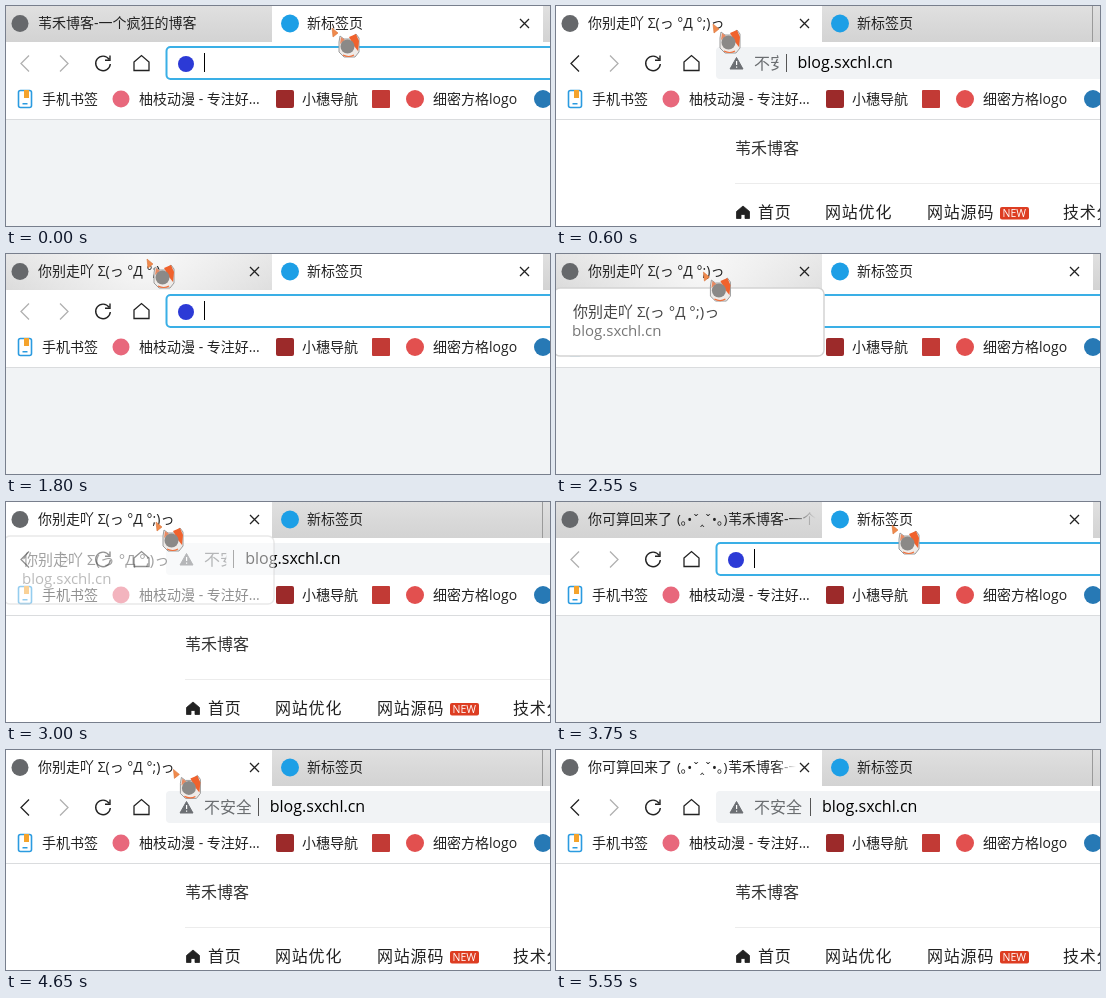
An HTML page with a canvas for the animation above (5700 ms loop, 544x220 px).

```html
<!DOCTYPE html>
<html lang="zh-CN">
<head>
<meta charset="utf-8">
<title>新标签页</title>
<style>
html, body { margin: 0; width: 100%; height: 100%; overflow: hidden; background: #fff; }
canvas { display: block; }
</style>
</head>
<body>
<canvas id="stage" width="544" height="220"></canvas>
<script>
const c = document.getElementById('stage').getContext('2d');
const LOOP = 5700, STEP = 150;
const FONT = '"Open Sans", "Noto Sans CJK SC", "Noto Sans CJK", "DejaVu Sans", sans-serif';
const BLOG = '苇禾博客', URL_TEXT = 'blog.sxchl.cn', AWAY = '你别走吖 Σ(っ °Д °;)っ';

// [time, tab that becomes active]
const switches = [[0, 2], [545, 1], [1300, 2], [2950, 1], [3700, 2], [4545, 1]];
// [time, x, y] of the pointer tip
const path = [
  [0, 326, 22], [150, 322, 22], [450, 162, 18], [600, 157, 18], [800, 165, 18],
  [1200, 340, 15], [1350, 340, 18], [1500, 330, 18], [1800, 141, 5], [2250, 146, 17],
  [3000, 150, 20], [3200, 155, 20], [3600, 333, 22], [3750, 336, 23], [4000, 326, 22],
  [4450, 168, 20], [4800, 167, 19], [5000, 205, 110], [5250, 250, 240]
];

const clamp = v => Math.max(0, Math.min(1, v));

function pointerAt(t) {
  const i = path.findIndex(k => k[0] > t);
  if (i < 0) return path[path.length - 1].slice(1);
  const [t0, x0, y0] = path[i - 1], [t1, x1, y1] = path[i];
  const u = (t - t0) / (t1 - t0), e = u * u * (3 - 2 * u);
  return [x0 + (x1 - x0) * e, y0 + (y1 - y0) * e];
}

function text(s, x, y, size = 14, color = '#222', spacing = 0) {
  c.font = `${size}px ${FONT}`;
  c.letterSpacing = spacing + 'px';
  c.fillStyle = color;
  c.fillText(s, x, y);
}
function rect(x, y, w, h, color, r = 0) {
  c.fillStyle = color;
  c.beginPath();
  c.roundRect(x, y, w, h, r);
  c.fill();
}
function outline(color, width) {
  c.strokeStyle = color;
  c.lineWidth = width;
  c.stroke();
}
function dot(x, y, r, color) {
  c.fillStyle = color;
  c.beginPath();
  c.arc(x, y, r, 0, 7);
  c.fill();
}
function shape(d, stroke, width = 1.2, fill) {
  const p = new Path2D(d);
  if (fill) { c.fillStyle = fill; c.fill(p); }
  if (stroke) { c.strokeStyle = stroke; c.lineWidth = width; c.stroke(p); }
}
function stops(gradient, ...colors) {
  colors.forEach((color, i) => gradient.addColorStop(i / (colors.length - 1), color));
  return gradient;
}
const fade = (from, to) => stops(c.createLinearGradient(from, 0, to, 0), '#222222', '#22222200');
const cross = x => shape(`M${x - 4.5} 13l9 9m0-9l-9 9`, '#222', 1.3);

function drawTabs(active, hover, title, x, y) {
  rect(0, 0, 544, 36, stops(c.createLinearGradient(0, 0, 0, 36), '#e0e0e0', '#d9d9d9', '#d3d3d3'));
  // inactive tabs light up around the pointer
  if (hover && hover !== active) {
    const glow = stops(c.createRadialGradient(x, y, 0, x, y, 190), '#ffffffcc', '#ffffff00');
    rect(hover === 1 ? 0 : 266, 0, hover === 1 ? 266 : 271, 36, glow);
  }
  rect(active === 1 ? 0 : 266, 0, active === 1 ? 266 : 271, 36, '#fff');
  if (active === 1) rect(536, 0, 1, 36, '#9a9a9a');

  dot(14, 17.5, 8.5, '#66686b');
  dot(284, 17.5, 9, '#1d9fe6');
  const closable = active === 1 || hover === 1;
  if (title === 'back') {
    text('你可算回来了', 32, 22);
    text('(｡•ˇ‸ˇ•｡)', 121, 22, 13);
    text(BLOG + '-一个疯狂的博客', 172, 22, 14, closable ? fade(218, 240) : fade(232, 260));
  } else {
    text(title === 'away' ? AWAY : BLOG + '-一个疯狂的博客', 32, 22);
  }
  text('新标签页', 301, 22);
  if (closable) cross(248.5);
  if (active === 2 || hover === 2) cross(518.5);
}

function drawToolbar(active, since) {
  rect(0, 36, 544, 78, '#fff');
  shape('M23 49.5l-8 8 8 8', active === 1 ? '#222' : '#b0b0b0', 1.3);
  shape('M54 49.5l8 8-8 8', '#b0b0b0', 1.3);
  shape('M103 53.2A7.3 7.3 0 1 0 104.3 58M104 49.5v4.8h-5', '#222', 1.4);
  shape('M128 56l7.5-6.5 7.5 6.5v8.5h-15z', '#222', 1.3);

  if (active === 2) {
    rect(160.5, 41, 420, 32, '#fff', 4);
    outline('#3aafe6', 2);
    dot(180, 58, 8, '#2c3ad6');
    if (since % 1060 < 530) rect(198, 47, 1, 19, '#000');
    return;
  }
  rect(160, 41, 400, 32, '#f1f3f5', 4);
  shape('M180.5 51.5l6.5 11.5h-13z', '#6c6f73', 1, '#6c6f73');
  rect(180, 55, 1.2, 4, '#fff');
  rect(180, 60.5, 1.2, 1.3, '#fff');
  const chip = 49 * clamp(since / 110);
  c.save();
  c.beginPath();
  c.rect(198, 41, chip, 32);
  c.clip();
  text('不安全', 198, 63, 16, '#6a6d70');
  c.restore();
  rect(Math.round(205 + chip), 48, 1, 18, '#555');
  text(URL_TEXT, 217 + chip, 62, 16, '#000');
}

function drawBookmarks() {
  rect(12.5, 84.5, 13, 17, '#fff', 2);
  outline('#2b9be0', 1.6);
  rect(18, 84, 5, 8, '#f5a32c');
  rect(16.5, 97, 5, 1.5, '#2b9be0');
  dot(115, 93, 8.5, '#e8687c');
  rect(270, 84, 18, 18, '#9c2a2a', 2);
  rect(366, 84, 18, 18, '#c23a35', 1);
  dot(409, 93, 9, '#e2504f');
  dot(537, 93, 9, '#2779b5');
  text('手机书签', 36, 98);
  text('柚枝动漫 - 专注好…', 133, 98);
  text('小穗导航', 296, 98);
  text('细密方格logo', 427, 98);
}

function drawPage(active) {
  rect(0, 113, 544, 107, active === 1 ? '#fff' : '#f1f3f5');
  rect(0, 113, 544, 1, '#dadcde');
  if (active === 2) return;
  text(BLOG, 179, 148, 16, '#333');
  rect(179, 177, 365, 1, '#ececec');
  shape('M180.5 205.5l6.5-5.5 6.5 5.5v7h-4.5v-4h-4v4h-4.5z', '#222', 0.8, '#222');
  [['首页', 202], ['网站优化', 269], ['网站源码', 371], ['技术分享', 507]]
    .forEach(([s, x]) => text(s, x, 212, 16, '#222', 0.8));
  rect(444, 201, 29, 12.5, '#dd3d22', 2);
  text('NEW', 446.5, 211.3, 10.5, '#fff');
}

function drawTooltip(t) {
  const alpha = clamp((t - 2350) / 200) * clamp((3050 - t) / 100);
  if (!alpha) return;
  c.save();
  c.globalAlpha = alpha;
  rect(-2, 34, 270, 68, '#fff', 6);
  outline('#d4d4d4', 1.5);
  text(AWAY, 17, 63, 15, '#444');
  text(URL_TEXT, 16, 82, 15, '#777');
  c.restore();
}

function drawPointer(x, y) {
  c.save();
  c.translate(x, y);
  shape('M0 0l6 5-5 4z', '#d8743c', 0.6, '#f08a4c');
  shape('M8 8l4 3h6l6-5 3 4v14l-4 5H12l-5-5V14z', '#9c9c9c', 1, '#efebe8');
  shape('M17 9l7-3 3 7-1 10-4-5z', null, 0, '#f0622d');
  shape('M9 9l4 3-5 4z', null, 0, '#e88a62');
  dot(15.5, 18.5, 7, '#8b8987');
  shape('M11 27q6 3 11 0', '#f0703c', 1.2);
  c.restore();
}

function draw(t) {
  const i = switches.filter(s => s[0] <= t).length - 1;
  const [start, active] = switches[i], since = t - start;
  const [x, y] = pointerAt(t);
  const hover = y < 36 ? (x < 266 ? 1 : 2) : 0;
  // the page title reacts a moment after the tab does
  const late = since < 120;
  const title = i === 0 && late ? 'plain' : (active === 2) !== late ? 'away' : 'back';
  drawTabs(active, hover, title, x, y);
  drawToolbar(active, since);
  drawBookmarks();
  drawPage(active);
  drawTooltip(t);
  drawPointer(x, y);
}

function tick() {
  draw(Math.floor(performance.now() % LOOP / STEP) * STEP);
  requestAnimationFrame(tick);
}
tick();
</script>
</body>
</html>
```
